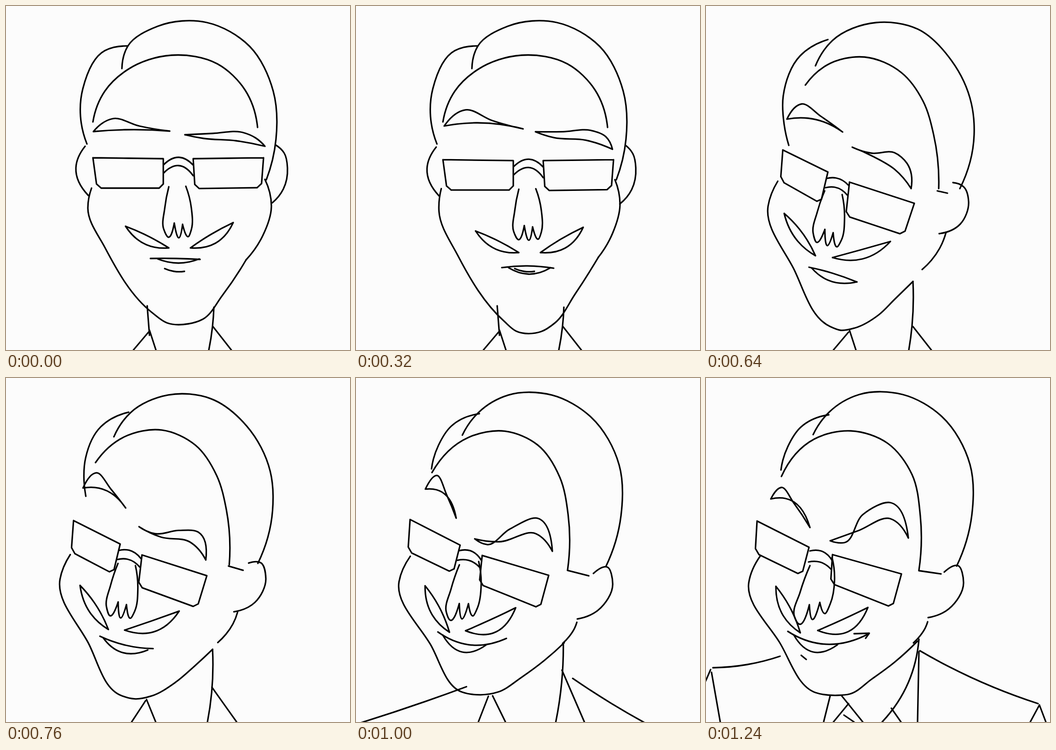
An HTML page for the animation above (1.28 s loop, 748x748 px).

```html
<!DOCTYPE html>
<html lang="en">
<head>
<meta charset="utf-8">
<title>Line portrait</title>
<style>
  html, body { margin: 0; width: 100%; height: 100%; overflow: hidden; background: #fcfcfc; }
  svg { display: block; width: 100%; height: 100%; }
  path { fill: none; stroke: #000; stroke-width: 3.3; stroke-linecap: round; stroke-linejoin: round; }
</style>
</head>
<body>
<svg id="stage" viewBox="0 0 748 748"></svg>
<script>
const LOOP = 1280;
// [time, pose]: fractions lie between two poses
const KEYS = [[0, 0], [200, 0.3], [480, 1], [640, 2], [920, 3], [1120, 4], [1240, 5]];
const POSES = 6;
// The drawing is held between these moments.
const glide = Array.from({ length: 10 }, (_, i) => 480 + 40 * i);
const STEPS = [0, 80, 200, 240, 320, ...glide, 920, 1000, 1120, 1160, 1240];

const stage = document.getElementById('stage');
const parts = [];
const mixPoint = (a, b, t) => a.map((v, k) => v + (b[k] - v) * t);

// Shapes turn control points into runs; each run is one smooth curve.
const curve = p => [p];
const corner = p => [p.slice(0, 2), p.slice(1)];
const leaf = tip => p => [p.slice(0, tip + 1), [...p.slice(tip), p[0]]];

function lens([tl, tr, br, bl]) {
  const toward = (a, b) => mixPoint(a, b, 9 / Math.hypot(b[0] - a[0], b[1] - a[1]));
  const rim = [tl, tr, toward(br, tr), toward(br, bl), toward(bl, br), toward(bl, tl), tl];
  return rim.slice(1).map((p, i) => [rim[i], p]);
}

// Drawn in the frame of three anchors: left top, right top, middle tip.
const NOSE = [
  [[0, 0], [-.49, .42], [-.79, .82], [-.63, .98], [-.1, .71]],
  [[-.1, .71], [0, 1], [.37, .74]],
  [[.37, .74], [.58, .98], [.83, .84], [1.07, .43], [1, 0]]
];
const nose = ([a, b, c]) => NOSE.map(run => run.map(([s, t]) =>
  a.map((v, k) => v + s * (b[k] - v) + t * (c[k] - v))));

// One row per pose: "=" repeats the row above, "+x,y" shifts it, "-" hides the part.
function part(rows, shape = curve) {
  const poses = [];
  const read = row => row.split(' ').map(p => p.split(',').map(Number));
  for (const row of rows.split('\n').map(r => r.trim())) {
    const prev = poses[poses.length - 1];
    if (row === '-') poses.push(null);
    else if (row === '=') poses.push(prev);
    else if (row[0] === '+') {
      const [[dx, dy]] = read(row.slice(1));
      poses.push(prev.map(([x, y]) => [x + dx, y + dy]));
    } else poses.push(read(row));
  }
  while (poses.length < POSES) poses.push(poses[poses.length - 1]);
  const el = document.createElementNS('http://www.w3.org/2000/svg', 'path');
  stage.append(el);
  parts.push({ el, poses, shape });
}

// Hair
part(`252,136 265,87 330,44 437,36 530,88 581,185 587,290 566,378
  =
  238,130 275,75 370,36 460,50 534,119 577,212 583,280 552,397
  230,125 265,76 330,38 425,38 510,86 571,190 575,300 542,411
  +3,-2`);
part(`265,87 215,97 167,180 162,240 176,300
  =
  265,73 205,108 168,195 170,258 180,303
  269,76 208,103 180,145 169,175 165,196
  +-2,4`);
part(`189,252 215,185 265,138 360,107 460,126 520,183 547,264
  =
  216,172 262,129 345,111 425,145 472,207 495,280 506,397
  166,200 250,127 330,116 395,148 440,220 458,295 458,418
  164,214 235,133 315,115 395,142 448,210 466,300 463,418`);
part(`-
  -
  503,402 525,407
  458,418 503,433
  463,419 511,426`);

// Ears
part(`586,302 605,320 612,352 603,398 579,428
  587,304 600,322 606,352 597,400 570,432
  537,384 560,393 571,425 553,474 507,495
  515,427 545,413 557,450 525,507 480,526
  +3,-5`);
part(`172,305 152,352 179,412
  +4,3
  -`);

// Jaw and cheek
part(`186,396 178,440 215,525 318,667 350,689 397,691 428,681 470,630 522,552
  185,398 182,450 225,553 325,698 347,719 407,719 435,695 480,625 530,543
  156,381 135,435 190,570 270,697 292,705 324,700 375,672 410,638 450,599
  118,388 94,441 163,582 225,682 262,688 306,680 360,648 410,611 448,578
  118,387 93,445 160,575 238,684 285,690 313,687 360,655 410,618 460,572`);
part(`522,552 558,500 577,437 563,377
  530,543 558,490 572,430 563,378
  470,573 490,553 508,527 522,492
  448,578 463,562 474,545 479,532
  +3,-2`);

// Neck and collar
part(`307,652 312,716
  =
  -`);
part(`310,709 277,748
  =
  =
  295,692 268,748
  277,692 263,748
  +-7,-1`);
part(`312,705 326,748
  =
  =
  297,691 325,748
  =
  295,691 341,748`);
part(`452,655 449,697 441,748
  =
  450,599 448,695 441,748
  448,578 446,670 434,748
  455,577 449,650 435,748
  463,568 440,662 383,748`);
part(`450,697 490,748
  =
  =
  445,640 517,748
  452,628 466,748
  463,595 460,748`);

// Shoulders, sleeves, tie
part(`-
  -
  -
  480,690 572,748 710,835
  458,598 530,647 715,730
  465,593 527,627 722,708`);
part(`-
  -
  -
  287,712 190,748 -20,825
  170,610 90,637 13,650
  161,605 90,623 15,630`);
part(`-
  -
  -
  -
  711,748 718,733 728,748
  705,748 725,711 739,748`, corner);
part(`-
  -
  -
  -
  -1,680 12,650
  +-2,-16`);
part(`-
  -
  -
  -
  20,653 34,748
  12,640 31,748`);
part(`-
  -
  -
  -
  292,748 314,746
  300,733 322,748`);
part(`-
  -
  -
  -
  -
  310,708 277,748`);
part(`-
  -
  -
  -
  -
  403,718 424,748`);

// Eyebrows
part(`190,273 232,245 290,261 356,272 260,269
  193,253 242,213 300,241 368,264 262,244
  176,246 208,213 250,240 297,274 222,244
  156,230 182,197 200,245 211,294 175,233
  143,259 166,234 193,268 228,321 175,258
  +-2,4`, leaf(3));
part(`389,280 450,277 515,275 543,287 563,305 500,293 430,288
  391,269 450,271 510,268 543,282 554,316 500,291 430,285
  318,307 360,320 410,319 437,342 446,397 410,355 365,328
  251,345 275,363 330,348 393,326 419,394 385,358 300,370
  269,357 300,361 340,300 400,274 439,351 400,309 330,335
  +1,-3`, leaf(4));

// Glasses
part(`189,330 342,332 342,396 198,396
  +0,7
  167,313 265,361 249,429 162,380
  120,306 226,361 211,421 115,375
  114,310 227,367 211,428 110,379
  +-3,1`, lens);
part(`407,332 560,330 555,395 411,397
  +0,7
  312,383 453,429 430,498 304,456
  274,387 415,431 396,502 266,449
  275,384 425,426 405,499 271,446`, lens);
part(`343,345 376,329 407,346
  +0,7
  262,375 283,374 310,390
  223,375 247,375 272,397
  +3,1`);
part(`343,363 375,347 407,369
  +0,7
  260,395 280,394 308,412
  219,394 243,394 268,410
  +4,6`);

// Nose
part(`354,393 391,392 376,504
  +0,9
  258,402 296,410 264,521
  224,405 262,405 230,523
  226,408 274,390 231,525`, nose);

// Moustache
part(`260,479 300,496 354,526 305,519
  +0,17
  170,451 203,485 238,543 200,512
  149,451 178,494 202,552 165,515
  +3,2`, leaf(2));
part(`401,526 445,497 494,471 455,516
  +0,17
  275,547 330,532 401,512 340,550
  235,550 285,528 344,500 295,555
  +8,-1`, leaf(2));

// Mouth
part(`314,549 370,549 422,551
  319,582 375,576 435,583
  224,568 275,581 328,600
  178,553 240,581 309,573
  178,551 250,578 354,556`);
part(`330,550 375,559 420,550
  333,582 375,599 425,582
  230,570 265,596 328,600
  187,559 230,596 282,580
  +4,0`);
part(`-
  -
  -
  -
  322,556 355,555 347,566`, corner);
part(`345,571 365,577 388,577
  -
  -
  -
  209,603 220,612
  +-2,0`);

// Spline through the points, spaced by chord length, with parabolic ends.
function trace(pts) {
  const last = pts.length - 1;
  const gap = [], dir = [];
  for (let i = 0; i < last; i++) {
    const [a, b] = [pts[i], pts[i + 1]];
    gap[i] = Math.hypot(b[0] - a[0], b[1] - a[1]) || 1;
    dir[i] = b.map((v, k) => (v - a[k]) / gap[i]);
  }
  const slope = [];
  for (let i = 1; i < last; i++) slope[i] = mixPoint(dir[i - 1], dir[i], gap[i - 1] / (gap[i - 1] + gap[i]));
  slope[0] = last > 1 ? mixPoint(slope[1], dir[0], 2) : dir[0];
  slope[last] = last > 1 ? mixPoint(slope[last - 1], dir[last - 1], 2) : dir[0];
  let d = 'M' + pts[0];
  for (let i = 0; i < last; i++) {
    const c1 = pts[i].map((v, k) => v + slope[i][k] * gap[i] / 3);
    const c2 = pts[i + 1].map((v, k) => v - slope[i + 1][k] * gap[i] / 3);
    d += `C${c1} ${c2} ${pts[i + 1]}`;
  }
  return d;
}

function poseAt(time) {
  const i = KEYS.findLastIndex(([t]) => t <= time);
  const [t0, p0] = KEYS[i];
  if (i === KEYS.length - 1) return p0;
  const [t1, p1] = KEYS[i + 1];
  return p0 + (p1 - p0) * (time - t0) / (t1 - t0);
}

function draw(time) {
  const pose = poseAt(time), k = Math.floor(pose);
  for (const { el, poses, shape } of parts) {
    const from = poses[k], to = poses[k + 1] || from;
    const pts = from && from.map((p, i) => mixPoint(p, to[i], pose - k));
    el.setAttribute('d', pts ? shape(pts).map(trace).join('') : '');
  }
}

const start = performance.now();
let shown = -1;
function tick() {
  const time = (performance.now() - start) % LOOP;
  const step = STEPS.findLast(t => t <= time);
  if (step !== shown) draw(shown = step);
  requestAnimationFrame(tick);
}
tick();
</script>
</body>
</html>
```
